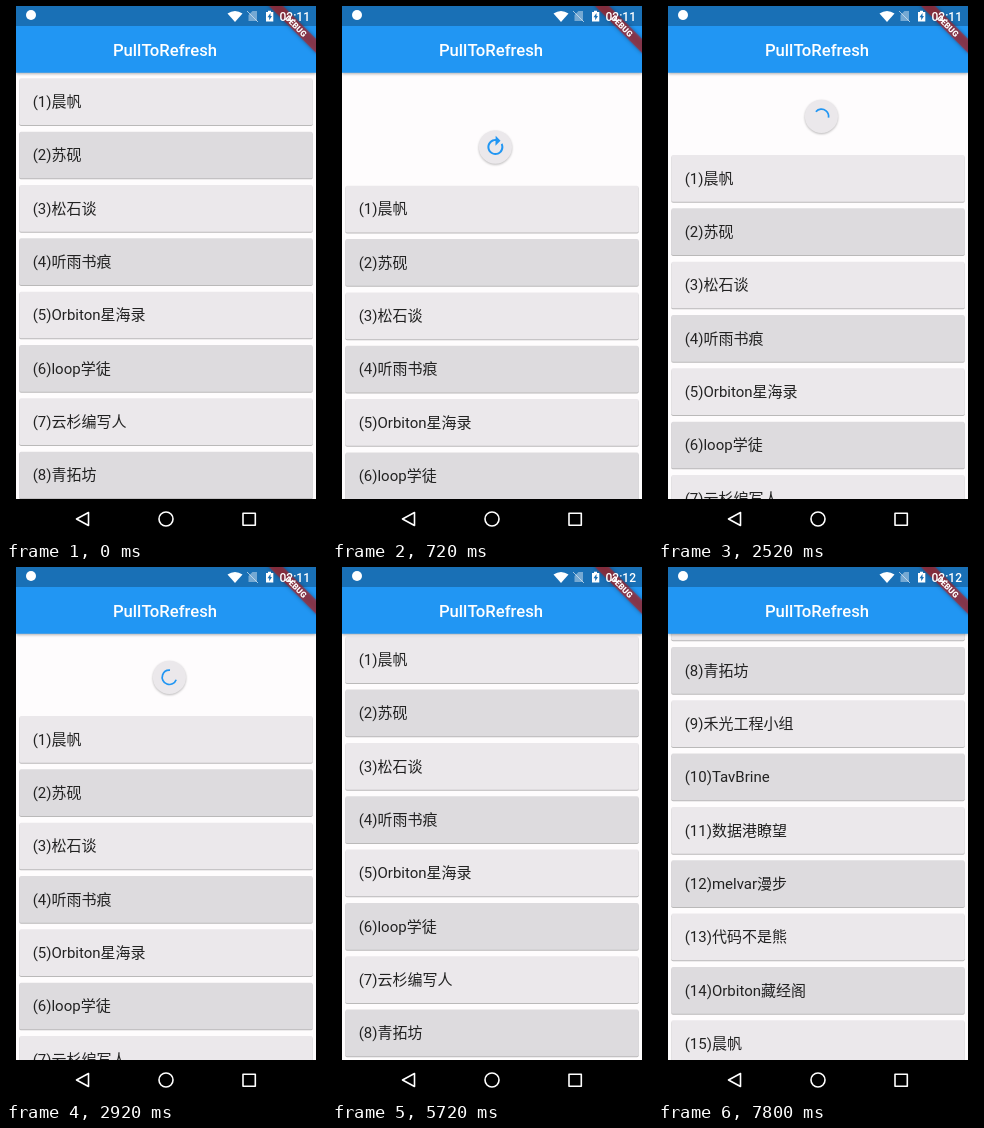
An HTML page for the animation above (8000 ms loop, 320 px wide and 533 px high).

```html
<!DOCTYPE html>
<html lang="zh-CN">
<head>
<meta charset="utf-8">
<style>
  html, body { margin: 0; height: 100%; overflow: hidden; background: #000; }
  svg { display: block; width: 100vw; height: 100vh; font-family: Roboto, "Noto Sans CJK SC", "Noto Sans CJK", sans-serif; }
  .raised { filter: drop-shadow(0 1px .5px #0004); }
  .floating { filter: drop-shadow(0 1.5px 1.2px #0004); }
  .ribbon { filter: drop-shadow(0 0 2px #0007); }
  #bar { filter: drop-shadow(0 1.5px 1.6px #0005); }
  #list text { font-size: 15px; fill: #222; }
</style>
</head>
<body>
<svg viewBox="0 0 320 533">
  <clipPath id="screen"><path d="M10 0H310V493H10z"/></clipPath>
  <g clip-path="url(#screen)">
    <path fill="#fefcfd" d="M10 0H310V493H10z"/>
    <g id="list"></g>
    <g id="badge">
      <circle class="floating" r="16.6" fill="#ebe8eb"/>
      <path id="arrow" fill="#2196f3" d="M17.65 6.35C16.2 4.9 14.21 4 12 4c-4.42 0-7.99 3.58-7.99 8s3.57 8 7.99 8c3.73 0 6.84-2.55 7.73-6h-2.08c-.82 2.33-3.04 4-5.65 4-3.31 0-6-2.69-6-6s2.69-6 6-6c1.66 0 3.14.69 4.22 1.78L13 11h7V4l-2.35 2.35z"/>
      <circle id="spinner" r="7.2" fill="none" stroke="#2196f3" stroke-width="1.7" pathLength="360"/>
    </g>
    <path id="bar" fill="#2196f3" d="M10 0H310V66.7H10z"/>
    <path fill="#1970b6" d="M10 0H310V20H10z"/>
    <text x="159" y="50" text-anchor="middle" font-size="16.67" font-weight="500" fill="#fff">PullToRefresh</text>
    <g transform="translate(310) rotate(45)">
      <path class="ribbon" fill="#b71c1c" fill-opacity=".68" d="M-34 23.3H34V33.3H-34z"/>
      <text y="31.3" text-anchor="middle" font-size="8.3" font-weight="900" fill="#fff">DEBUG</text>
    </g>
    <!-- status icons -->
    <g fill="#fff">
      <circle cx="25" cy="9" r="5"/>
      <path d="M221.5 7.500Q229 2.500 236.500 7.500L229 16z"/>
      <path fill-opacity=".4" d="M251 5V15H242.500V9L246.500 5z"/>
      <path d="M260 6H262V4.700H265V6H267.300V15.500H260z"/>
      <path fill="#1970b6" d="M264.500 7L261.500 11.200H263.200V14.200L266 10H264.500z"/>
      <text id="clock" x="273.500" y="14.500" font-size="12" font-weight="500"></text>
    </g>
    <path stroke="#dce8f2" stroke-opacity=".7" d="M241 5L252 16"/>
  </g>
  <!-- navigation keys -->
  <g fill="none" stroke="#fff" stroke-width="1.600" stroke-linejoin="round">
    <path d="M82.500 506.500V519.500L70.500 513z"/>
    <circle cx="160" cy="513" r="7"/>
    <path d="M237 507.200H249.300V519.200H237z"/>
  </g>
</svg>
<script>
const $ = id => document.getElementById(id);
const names = ['晨帆', '苏砚', '松石谈', '听雨书痕', 'Orbiton星海录', 'loop学徒', '云杉编写人', '青拓坊',
  '禾光工程小组', 'TavBrine', '数据港瞭望', 'melvar漫步', '代码不是熊', 'Orbiton藏经阁'];
const PITCH = 53.333, TOP = 70;

$('list').innerHTML = Array.from({ length: 16 }, (_, i) => `
  <g transform="translate(13.3 ${TOP + i * PITCH})">
    <rect class="raised" width="293.4" height="46.7" rx="1.7" fill="${i % 2 ? '#dddbde' : '#ebe8eb'}"/>
    <text x="13.4" y="28.6">(${i + 1})${names[i % names.length]}</text>
  </g>`).join('');

const easeOut = p => 1 - (1 - p) ** 2;
const settle = p => 1 - (1 - p) ** 3;
const smooth = p => p * p * (3 - 2 * p);

// Each move: start, end, target offset, easing
const moves = [
  [0, 840, 112, easeOut],
  [840, 1200, 138, easeOut],
  [1320, 1520, 137, smooth],
  [1580, 2120, 79, settle],
  [3120, 3440, 0, smooth],
  [5700, 6280, -205, smooth],
  [7460, 7800, -363.4, smooth]
];

function offsetAt(t) {
  let y = 2.3;
  for (const [start, end, target, ease] of moves) {
    if (t <= start) break;
    y += (target - y) * ease(Math.min(1, (t - start) / (end - start)));
  }
  return y;
}

function draw(now) {
  const t = Math.floor(now % 8000 / 40) * 40;
  const y = offsetAt(t);
  const loading = t >= 1960 && t < 3440;
  $('list').setAttribute('transform', `translate(0 ${y})`);
  $('badge').setAttribute('transform', `translate(163.4 ${y + TOP - 38.7})`);
  $('badge').style.display = y > 0 ? '' : 'none';
  $('arrow').style.display = loading ? 'none' : '';
  $('spinner').style.display = loading ? '' : 'none';
  $('arrow').setAttribute('transform', `rotate(${(y - 137) * 1.6}) translate(-12 -12)`);

  const s = t - 2520;
  const sweep = 150 + 110 * Math.sin(s / 1333 * 2 * Math.PI);
  $('spinner').setAttribute('stroke-dasharray', `${sweep} 360`);
  $('spinner').setAttribute('transform', `rotate(${s * .4 - 140})`);
  $('clock').textContent = t < 3160 ? '02:11' : '02:12';
}

const began = performance.now();
function tick() {
  draw(performance.now() - began);
  requestAnimationFrame(tick);
}
tick();
</script>
</body>
</html>
```
